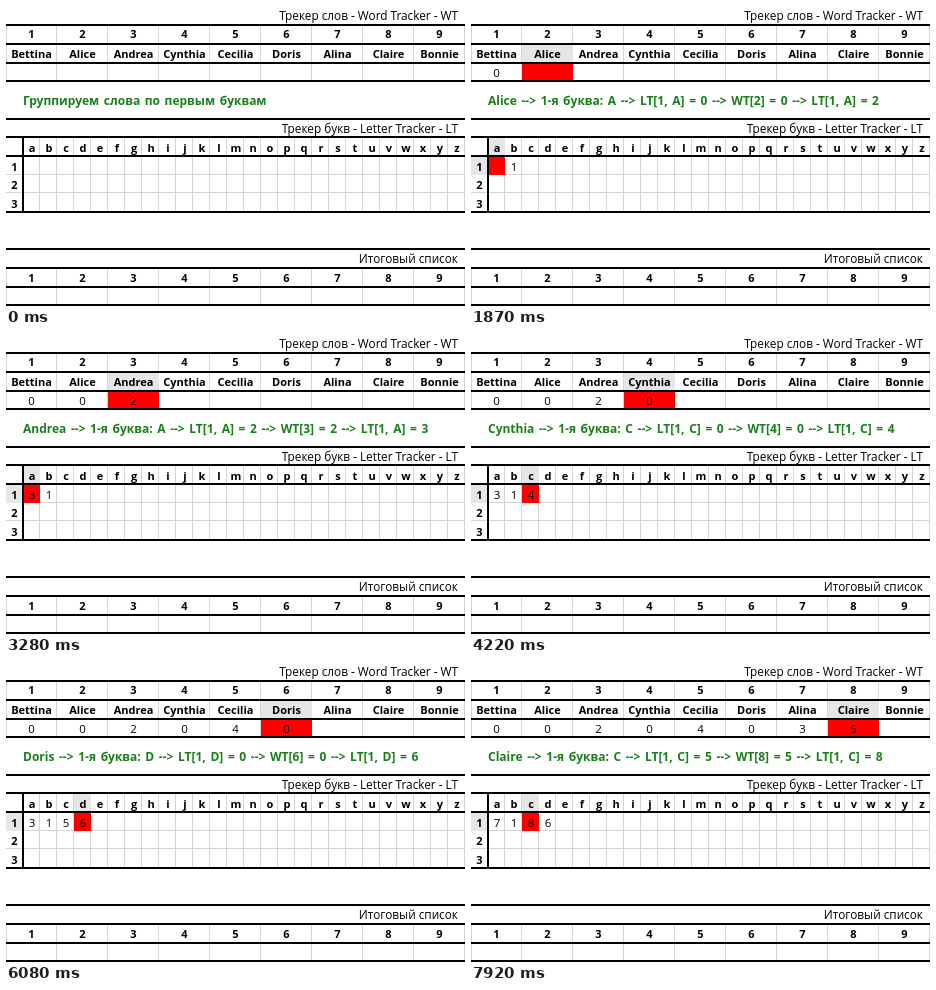
Write an HTML page that moves like this. It is 459 px wide and 300 px high and loops after 8 s.

```html
<!DOCTYPE html>
<html lang="ru">
<head>
<meta charset="utf-8">
<style>
html, body { margin: 0; width: 100%; height: 100%; overflow: hidden; background: #fff; }
svg { display: block; font: 11.5px "Open Sans", "Noto Sans", sans-serif; text-anchor: middle; }
.title { font-size: 11.8px; text-anchor: end; }
.bold { font-size: 11px; font-weight: 700; }
.note { font-size: 12px; font-weight: 700; text-anchor: start; word-spacing: 1.5px; fill: #1a7f1a; }
</style>
</head>
<body>
<svg id="stage" width="459" height="300" viewBox="0 0 459 300"></svg>
<script>
const LOOP = 8000;
const TIMES = [930, 1400, 1870, 2340, 2810, 3280, 3750, 4220, 4690,
  5150, 5620, 6080, 6540, 7000, 7460, 7920];
const WORDS = ["Bettina", "Alice", "Andrea", "Cynthia", "Cecilia", "Doris", "Alina", "Claire", "Bonnie"];
const LETTERS = [..."abcdefghijklmnopqrstuvwxyz"];
const WORD_W = 51, LETTER_W = 17;
const GRID = "#d4d4d4", SHADE = "#e6e6e6", RED = "#f00";
const stage = document.getElementById("stage");

const rowY = k => Math.floor(k * 56 / 3);
const rect = (x, y, w, h, fill) =>
  `<rect x="${x}" y="${y}" width="${w}" height="${h}" fill="${fill}"/>`;
const text = (x, y, s, cls = "") =>
  `<text x="${x}" y="${y}" class="${cls}">${String(s).replace(/>/g, "&gt;")}</text>`;
const wordX = i => i * WORD_W + 25.5;
const letterX = i => (i + 1) * LETTER_W + 9;

function gridLines() {
  let out = "";
  for (let i = 0; i <= 9; i++) {
    const x = Math.max(0, i * WORD_W - 1);
    out += rect(x, 20, 1, 54, GRID) + rect(x, 263, 1, 35, GRID);
  }
  for (let i = 2; i <= 27; i++) out += rect(i * LETTER_W - 1, 132, 1, 73, GRID);
  return out + rect(0, rowY(9), 459, 1, GRID) + rect(0, rowY(10), 459, 1, GRID);
}

function borders() {
  const rows = [1, 2, 3, 4, 6, 7, 8, 11, 13, 14, 15, 16];
  return rows.map(k => rect(0, rowY(k), 459, 2, "#000")).join("") +
    rect(16, 131, 2, 75, "#000");
}

function labels() {
  let out = text(452, 14, "Трекер слов - Word Tracker - WT", "title") +
    text(452, 127, "Трекер букв - Letter Tracker - LT", "title") +
    text(452, 257, "Итоговый список", "title");
  WORDS.forEach((word, i) => {
    out += text(wordX(i), 32, i + 1, "bold") + text(wordX(i), 52, word, "bold") +
      text(wordX(i), 276, i + 1, "bold");
  });
  LETTERS.forEach((c, i) => out += text(letterX(i), 146, c, "bold"));
  [165, 183, 202].forEach((y, i) => out += text(8.5, y, i + 1, "bold"));
  return out;
}

// Each word takes two steps: mark its cells, then write their values.
function draw(step) {
  const wt = [], lt = {};
  let note = "Группируем слова по первым буквам", marks = "";

  for (let s = 0; s < step; s += 2) {
    const i = s / 2, word = WORDS[i], c = word[0].toLowerCase();
    const prev = lt[c] || 0, written = step - s > 1;
    if (written) {
      wt[i] = prev;
      lt[c] = i + 1;
    }
    if (step - s <= 2) {
      const C = word[0], col = LETTERS.indexOf(c);
      const lx = (col + 1) * LETTER_W, left = Math.max(18, lx);
      note = `${word} --> 1-я буква: ${C} --> LT[1, ${C}] = ${prev}` +
        ` --> WT[${i + 1}] = ${prev} --> LT[1, ${C}] = ${i + 1}`;
      marks = rect(i * WORD_W, 39, WORD_W, 17, SHADE) +
        rect(i * WORD_W, 57, WORD_W, 18, RED) +
        rect(left, 132, lx + LETTER_W - left, 17, SHADE) +
        rect(left, 151, lx + LETTER_W - left, 18, RED) +
        rect(0, 151, 16, 18, SHADE);
    }
  }

  const values = wt.map((v, i) => text(wordX(i), 71, v)).join("") +
    Object.keys(lt).map(c => text(letterX(LETTERS.indexOf(c)), 165, lt[c])).join("");
  stage.innerHTML = gridLines() + marks + borders() + labels() + values +
    text(17, 99, note, "note");
}

let shown = -1;
function tick(now) {
  const t = now % LOOP;
  const step = TIMES.filter(at => at <= t).length;
  if (step !== shown) draw(shown = step);
  requestAnimationFrame(tick);
}
tick(0);
</script>
</body>
</html>
```
